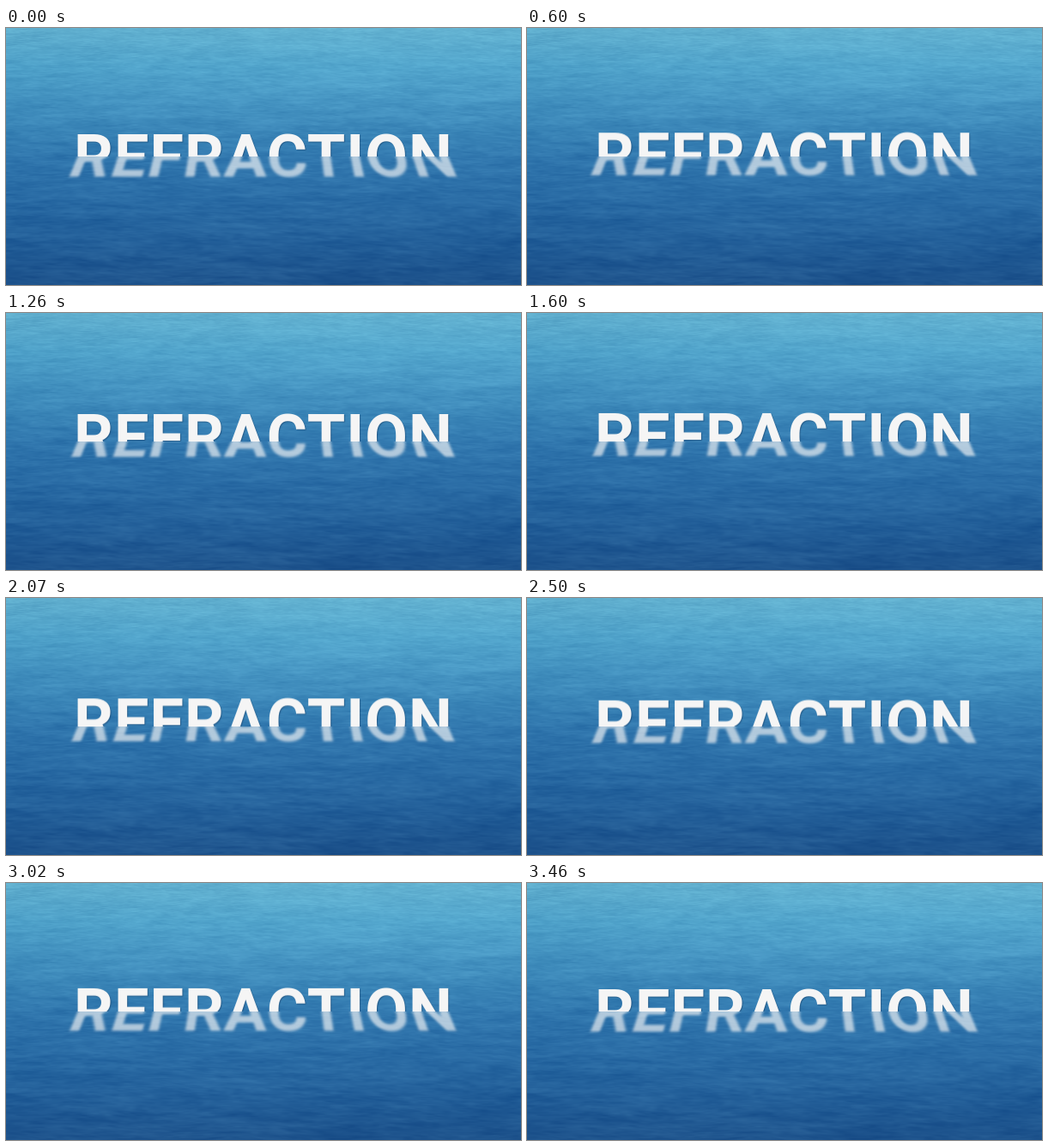
An HTML page with a canvas that plays this animation: 600x300 px, repeating every 3.51 s.

```html
<!DOCTYPE html>
<html lang="en">
<head>
<meta charset="utf-8">
<title>Refraction</title>
<style>
html, body { margin: 0; width: 100%; height: 100%; overflow: hidden; background: #2f73aa; }
#stage { position: relative; width: 600px; height: 300px; overflow: hidden; }
#water { position: absolute; left: 0; top: 0; display: block; }
.half { position: absolute; left: 0; width: 600px; height: 150px; overflow: hidden; }
.air { top: 0; }
.sea { top: 150px; perspective: 300px; perspective-origin: 50% 0; }
.plane { position: absolute; left: 0; top: 0; width: 600px; height: 150px;
  transform-origin: 50% 0; transform: rotateX(30deg); }
.word { position: absolute; left: 0; width: 600px; text-align: center; white-space: nowrap;
  font: 700 72px/72px Roboto, sans-serif; letter-spacing: 1px; color: #f5f5f5; }
.air .word { top: 116px; text-shadow: 1px 1px 1px rgba(0, 20, 50, .3); }
.sea .word { top: -34px; opacity: .66; filter: blur(1.5px); }
</style>
</head>
<body>
<div id="stage">
  <canvas id="water" width="600" height="300"></canvas>
  <div class="half air"><div class="word">REFRACTION</div></div>
  <div class="half sea"><div class="plane"><div class="word" aria-hidden="true">REFRACTION</div></div></div>
</div>
<script>
const W = 600, H = 300, LOOP = 3510, LIFT = 7.2;

// Depth colours: y, red, green, blue
const DEPTHS = [
  [0, 99, 178, 209], [45, 83, 166, 205], [85, 72, 151, 196], [120, 59, 134, 184],
  [155, 49, 119, 174], [200, 43, 109, 166], [250, 35, 95, 153], [300, 30, 83, 140]
];

const mix = (a, b, t) => a + (b - a) * t;
const fade = t => t * t * (3 - 2 * t);

function hash(x, y) {
  let n = Math.imul(x, 374761393) + Math.imul(y, 668265263);
  n = Math.imul(n ^ (n >>> 13), 1274126177);
  return ((n ^ (n >>> 16)) >>> 0) / 4294967296;
}

function noise(x, y) {
  const i = Math.floor(x), j = Math.floor(y), u = fade(x - i), v = fade(y - j);
  return mix(mix(hash(i, j), hash(i + 1, j), u),
             mix(hash(i, j + 1), hash(i + 1, j + 1), u), v) * 2 - 1;
}

function depthColour(y) {
  const k = Math.max(1, DEPTHS.findIndex(d => d[0] >= y));
  const a = DEPTHS[k - 1], b = DEPTHS[k], t = (y - a[0]) / (b[0] - a[0]);
  return [1, 2, 3].map(c => mix(a[c], b[c], t));
}

// Ripples grow towards the viewer
function ripple(x, y) {
  const h = 2 + y * .01;
  const u = (x - 300) / (h * 8) + 80;
  const v = Math.log(h) / .01 + noise(x / 90, y / 30) * .8 - x * .006;
  return 4.5 * noise(u + v * .15, v)
       + 4.5 * noise(u * 2.2 - v * .3 + 31, v * 1.9 + 17)
       + 3.5 * noise(u * 4.5 + v * .4 + 13, v * 3.1 + 41)
       + 4.5 * noise(u * .5 + 9, v * .45 + 53);
}

function paintWater() {
  const ctx = document.getElementById('water').getContext('2d');
  const img = ctx.createImageData(W, H);
  for (let y = 0, p = 0; y < H; y++) {
    const base = depthColour(y);
    for (let x = 0; x < W; x++, p += 4) {
      const side = (x - 300) / 300;
      const r = ripple(x, y) + 4 * side * (1 - y / H) - 3 * side * side;
      img.data[p] = base[0] + r * .9;
      img.data[p + 1] = base[1] + r;
      img.data[p + 2] = base[2] + r * .8;
      img.data[p + 3] = 255;
    }
  }
  ctx.putImageData(img, 0, 0);
}

paintWater();
for (const word of document.querySelectorAll('.word')) {
  word.animate(
    [{ transform: 'translateY(0)' }, { transform: `translateY(${-LIFT}px)` }],
    { duration: LOOP / 2, easing: 'ease-in-out', direction: 'alternate', iterations: Infinity }
  );
}
</script>
</body>
</html>
```
